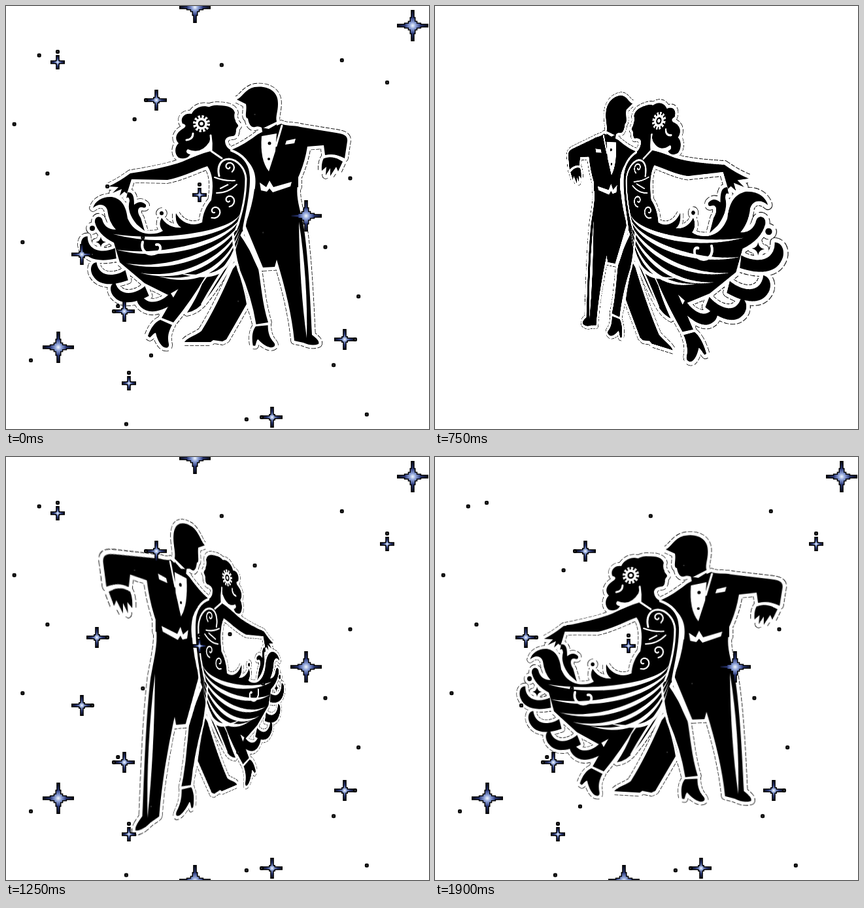
An HTML page with a canvas that plays this animation: 647 px wide and 647 px high, repeating every 1950 ms.

```html
<!DOCTYPE html>
<html lang="en">
<head>
<meta charset="utf-8">
<title>Turning dancers</title>
<style>
html, body { margin: 0; width: 100%; height: 100%; overflow: hidden; background: #fff }
#stage { position: relative; width: 100%; height: 100%; overflow: hidden; contain: strict }
svg, canvas { position: absolute; left: 0; top: 0; width: 647px; height: 647px }
.line { fill: none; stroke: #fff; stroke-width: 3; stroke-linecap: round; stroke-linejoin: round }
</style>
</head>
<body>
<div id="stage">
<svg id="pair" viewBox="0 0 647 647">
<defs>
<path id="shoe" d="M0 0L18 8C14 15 10 25 13 37C14 43 9 44 4 41C-1 37 -5 29 -7 20C-10 20 -13 25 -16 27L-19 25C-15 13 -8 3 0 0Z"/>
<path id="plume" d="M0 0C-10 0 -12 12 -8 20C-2 34 15 40 44 34L42 18C25 26 0 24 0 0Z"/>
<g id="body">
  <!-- man -->
  <path d="M353 143C361 140 366 127 380 124C400 121 417 130 416 150C416 162 412 168 414 177L393 187Q387 183 381 185C375 187 371 180 370 172C364 171 369 160 367 150Z"/>
  <path d="M388 194L421 180C428 184 440 182 450 185L505 194C518 196 523 199 522 207L518 233Q503 225 488 228L486 213L461 215Q457 240 447 262L447 277L380 284C384 262 380 250 372 240Q362 228 345 220Q365 212 388 194Z"/>
  <path d="M380 280L446 274C443 292 450 312 455 335C462 380 465 440 468 503C474 508 480 512 478 517Q468 521 455 515L441 512Q436 460 414 388L411 399L393 400L366 335Q377 305 380 280Z"/>
  <path d="M486 233Q500 228 515 238L508 253L505 246L496 260L496 248L489 259L490 246L483 252Q482 240 486 233Z"/>
  <path d="M352 396Q364 430 368 456L337 510L331 513L317 511L313 514L273 514C276 508 290 504 299 497Q322 460 347 402Z"/>
  <!-- woman -->
  <path d="M312 155C300 150 288 156 284 165C272 163 266 172 270 180C277 181 275 186 270 188C260 194 257 203 264 210C258 215 257 226 264 232Q276 236 282 227C276 226 274 222 278 219Q298 228 311 208Q316 190 320 165Z"/>
  <path d="M303 166C305 156 313 151 325 152Q347 152 350 163Q348 170 351 175C351 179 356 181 355 184Q351 188 352 191Q351 200 346 199Q336 200 335 206C335 214 340 219 347 222Q367 234 371 242C376 270 372 310 362 345L300 335C300 318 307 305 314 297Q320 262 308 245C288 252 268 262 247 266L192 265L185 287L181 284L174 290L177 280L163 286L172 277L157 276Q174 268 190 256C215 252 245 247 270 238Q297 226 313 222L313 195Q302 184 303 166Z"/>
  <path d="M355 346Q374 372 386 402C390 425 392 455 401 484L382 487C376 460 362 430 357 400L345 360Z"/>
  <path d="M268 425L306 412Q284 450 256 484L238 477Z"/>
  <path d="M345 388Q325 425 305 450Q293 466 277 469Q292 446 300 425Q316 400 340 382Z"/>
  <use href="#shoe" transform="translate(236 480)"/>
  <use href="#shoe" transform="translate(382 490) rotate(-29) scale(.95)"/>
  <!-- skirt -->
  <path d="M300 331C285 338 268 332 260 317Q258 333 268 339Q248 340 238 324Q232 335 240 344Q230 350 214 348C200 345 192 338 186 325C184 308 178 295 162 292C148 291 136 298 133 309C142 301 152 303 155 312Q157 330 168 342Q151 342 147 326C144 320 135 322 136 331Q141 350 165 362L174 392L212 424L248 442L272 428L306 414L342 386L362 343Z"/>
  <path d="M186 285C196 284 196 296 196 304Q206 296 214 304Q215 310 209 308C202 306 199 314 206 324L212 344L200 334Q184 315 189 298Q188 290 184 294Z"/>
  <path d="M145 353Q146 360 153 361Q146 362 145 369Q144 362 137 361Q144 360 145 353Z"/>
  <circle cx="238" cy="317" r="3"/><circle cx="132" cy="340" r="4"/>
  <g id="plumes"></g>
</g>
</defs>
<use href="#body" stroke="#000" stroke-width="11.4" stroke-linejoin="round" stroke-dasharray="6 2"/>
<use href="#body" fill="#fff" stroke="#fff" stroke-width="9.8" stroke-linejoin="round"/>
<use href="#body"/>
<g fill="#fff">
  <path d="M391 199L414 195L412 222L402 253Q388 235 391 199Z"/>
  <path d="M429 206L443 203L441 210L427 212Z"/>
  <path d="M388 270L398 277L403 267L409 277L437 269L435 276L408 285L403 279L399 284L390 282Z"/>
  <path d="M448 330Q449 430 460 508Q462 420 448 330Z"/>
  <circle cx="299" cy="180" r="9"/>
  <path id="folds"/>
</g>
<g class="line">
  <path d="M386 194L417 179M422 183L413 214M487 231Q502 225 519 236"/>
  <path d="M345 221Q374 232 375 262C376 290 367 320 364 341Q372 370 388 402" stroke-width="4"/>
  <path d="M313 198Q315 210 314 222L330 233M276 205Q286 204 286 195"/>
  <path d="M326 260C322 243 330 234 341 234C354 235 366 248 367 264Q367 300 352 342"/>
  <path d="M319 262Q334 268 350 267M322 286Q340 286 353 273M328 279L344 271" stroke-width="2"/>
  <path d="M347 348Q349 380 356 404Q374 445 381 488M345 384Q318 424 300 456" stroke-width="3.5"/>
  <path d="M209 361C205 376 219 384 232 377C239 372 236 363 230 365" stroke-width="4"/>
  <path id="swirls" stroke-width="2.2"/>
  <circle cx="299" cy="180" r="10" stroke-width="6" stroke-dasharray="3 2.24" stroke-linecap="butt"/>
</g>
<path d="M391 186L402 188L414 181L415 194L403 193L393 197Z"/>
<circle cx="403" cy="210" r="2.5"/><circle cx="402" cy="234" r="2"/>
<circle cx="299" cy="180" r="4" fill="#fff" stroke="#000" stroke-width="2.5"/>
</svg>
<canvas id="sky" width="647" height="647"></canvas>
</div>
<script>
const LOOP = 1950, STEP = 50, SIZE = 647;
const $ = id => document.getElementById(id);
const ctx = $('sky').getContext('2d');
const range = n => [...Array(n).keys()];

// point on a circle around the middle of the skirt
function rim(deg, r) {
  const a = deg * Math.PI / 180;
  return [225 + r * Math.cos(a), 340 + r * Math.sin(a)];
}

// curled hem
$('plumes').innerHTML = range(4).map(i =>
  `<use href="#plume" transform="translate(${rim(173 - 24 * i, 101)}) rotate(${-8 * i})"/>`).join('');

// tapered folds fanning out from the hip
$('folds').setAttribute('d', range(6).map(i => {
  const [x, y] = rim(172 - 22 * i, 62 + 3 * i);
  const fold = sag => `C345 ${345 + 9 * i + sag} ${x + 75} ${y + 12 + sag} ${x} ${y}`;
  const back = `C${x + 75} ${y + 21} 345 ${354 + 9 * i} 358 ${318 + 6 * i}`;
  return `M358 ${318 + 6 * i}${fold(0)}${back}Z`;
}).join(''));

// spirals on the bodice
const swirl = (x, y, r, turn) => 'M' + range(16).map(i => {
  const a = turn - i * .45, d = r * (1 - i / 18);
  return `${x + d * Math.cos(a)} ${y + d * Math.sin(a)}`;
}).join('L');
$('swirls').setAttribute('d', swirl(341, 246, 9, 1) + swirl(319, 314, 11, 2) + swirl(341, 297, 10, 1.5));

// evenly scattered specks
const dots = range(22).map(i => [(i + 1) * .7549 % 1 * SIZE, (i + 1) * .5698 % 1 * SIZE]);

// x, y, arm; three at a time blink together
const stars = [
  [230, 144, 16], [459, 321, 24], [80, 522, 24],
  [407, 629, 16], [296, 289, 11], [181, 467, 16],
  [622, 30, 24], [188, 577, 11], [518, 510, 16],
  [79, 86, 11], [289, 2, 24], [116, 380, 16],
  [583, 133, 11], [139, 276, 16], [289, 648, 24]];

function dot(x, y) {
  ctx.fillStyle = '#000';
  ctx.beginPath();
  ctx.roundRect(x - 3, y - 3, 6, 6, 2);
  ctx.fill();
  ctx.fillStyle = '#333';
  ctx.fillRect(x - 1, y - 1, 2, 2);
}

function star(x, y, r) {
  const layers = [[r, 2.8], [r * .3, r * .3]];
  if (r > 20) layers.push([r * .55, 4.5]);
  const cross = inset => layers.forEach(([l, w]) => {
    l -= inset;
    w -= inset;
    ctx.fillRect(x - l, y - w, 2 * l, 2 * w);
    ctx.fillRect(x - w, y - l, 2 * w, 2 * l);
  });
  const glow = ctx.createRadialGradient(x, y, 0, x, y, r);
  glow.addColorStop(0, '#f4faff');
  glow.addColorStop(.2, '#8fa3d8');
  glow.addColorStop(.5, '#2c3a7c');
  glow.addColorStop(1, '#05060f');
  ctx.fillStyle = '#000';
  cross(0);
  ctx.fillStyle = glow;
  cross(1.5);
}

function drawSky(t) {
  ctx.clearRect(0, 0, SIZE, SIZE);
  if (t >= 100 && t < 1100) return;
  dots.forEach(d => dot(...d));
  stars.forEach(([x, y, r], i) => {
    const blink = 1350 + 150 * Math.floor(i / 3);
    if ((t - blink + LOOP) % LOOP >= 150) star(x, y, r);
    if (r === 16) dot(x + (i < 6 ? -r : r), y);
    if (r === 11) dot(x, y - r - 5);
  });
}

function frame() {
  const t = Math.floor(performance.now() % LOOP / STEP) * STEP;
  $('pair').style.transform = `perspective(545px) rotateY(${360 * t / LOOP}deg)`;
  drawSky(t);
  requestAnimationFrame(frame);
}
frame();
</script>
</body>
</html>
```
